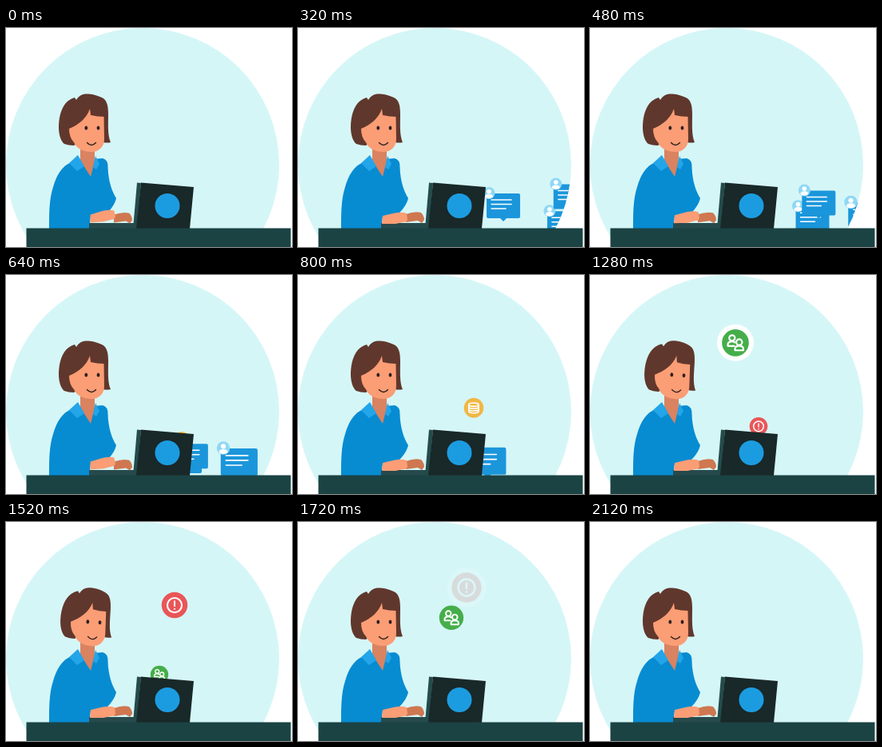
An HTML page for the animation above (2200 ms loop, 358 by 274 pixels).

```html
<!DOCTYPE html>
<html lang="en">
<head>
<meta charset="utf-8">
<title>Messages at a laptop</title>
<style>
  html, body { margin: 0; width: 100%; height: 100%; overflow: hidden; background: #fff; }
  svg { display: block; width: 358px; height: 274px; }
  .line { fill: none; stroke: #fff; stroke-width: 2.2; stroke-linecap: round; stroke-linejoin: round; }
  .thin { stroke-width: 1.5; }
</style>
</head>
<body>
<svg viewBox="0 0 358 274">
  <defs>
    <clipPath id="room"><circle cx="171" cy="171" r="171"/></clipPath>

    <g id="bubble">
      <path fill="#1b96db" d="M2 0H40Q42 0 42 2V29Q42 31 40 31H25L21 35L17 31H2Q0 31 0 29V2Q0 0 2 0Z"/>
      <path class="line thin" d="M6 8H31M6 13.500H31M6 19H24"/>
      <circle cx="3" cy="-.5" r="7.500" fill="#8fd8f5"/>
      <circle cx="3" cy="-2.500" r="2.800" fill="#fff"/>
      <path fill="#fff" d="M-2 4.500Q-2 .8 3 .8Q8 .8 8 4.500Q3 8 -2 4.500Z"/>
    </g>

    <g id="stack" class="line">
      <ellipse cy="-5.500" rx="8.500" ry="3"/>
      <path d="M-8.500 -5.500V6C-8.500 10 8.500 10 8.500 6V-5.500M-8.500 -1.500C-8.500 2.400 8.500 2.400 8.500 -1.500M-8.500 2.300C-8.500 6.200 8.500 6.200 8.500 2.300"/>
    </g>
    <g id="people" class="line">
      <circle cx="-4.200" cy="-6" r="3.600"/>
      <path d="M-1.500 4H-9.500V2C-9.500 -2 -3 -2.500 -.8 -.5"/>
      <circle cx="4.800" cy="-.8" r="3.700"/>
      <path d="M-.5 9.500V7.500C-.5 2.600 10 2.600 10 7.500V9.500Z"/>
    </g>
    <g id="alert" class="line">
      <circle r="9.500"/>
      <path d="M0 -5V1M0 4.900V5"/>
    </g>
  </defs>

  <circle cx="171" cy="171" r="171" fill="#d5f6f7"/>
  <g id="mail" clip-path="url(#room)"></g>
  <g id="coins"></g>

  <path fill="#078cd2" d="M54 251C54 232 54 214 59 199C63 185 70 172 82 168L110 164L121 163Q128 165 127.500 174C128 192 133 205 138 213C136 221 131 227 127 231L106 236L104 251Z"/>
  <path fill="#d98361" d="M93 148H111V166L106 186L93 166Z"/>
  <path fill="#23a5ea" d="M79 169L90 159L98 173L89 179ZM112 160L117 170L113 177L109 174Z"/>

  <g id="head">
    <path fill="#60372c" d="M88 90L86 87Q82 88 78 91C70 97 66 110 66 124C66 134 69 142 73 145Q78 147 85 147L95 140L120 112L121 143Q127 144 131 143C127 134 128 121 128 108C128 96 126 90 120 87C112 83 104 82 99 82.500Q92 83 88 90Z"/>
    <path fill="#fb9d75" d="M105 101L106 109Q114 111 122.500 111L123 139C123 149 116 155 107 155C97 155 88 151 85 143Q79 137 79 126C91 121 101 113 105 101Z"/>
    <ellipse class="eye" cx="100.300" cy="125" fill="#2c2020"/>
    <ellipse class="eye" cx="115.500" cy="125" fill="#2c2020"/>
    <path d="M101.500 143.500Q107 149.500 112.500 143.500" fill="none" stroke="#2c2020" stroke-width="1.400" stroke-linecap="round"/>
  </g>

  <path fill="#274a4c" d="M104 244H162V251H104Z"/>
  <path id="farHand" fill="#cf7750" d="M135 233Q146 229 154 231Q158 235 158 240L155 244L150 241L135 243Z"/>
  <path id="nearHand" fill="#fb9d75" d="M106 235L121 231.500Q131 230 136 232L137 239Q137 243 132 243L122 245H105Z"/>

  <path fill="#234c4b" d="M164 193.500L169 194L164 251H159Z"/>
  <path fill="#192829" d="M169 193.500L235 199L230 251H163Z"/>
  <circle cx="202" cy="222.500" r="15.500" fill="#1c9ce0"/>
  <rect x="25.500" y="250.500" width="331" height="24" fill="#1b4344"/>
</svg>

<script>
const LOOP = 2200, STEP = 40;
const $ = id => document.getElementById(id);

function set(el, attrs) {
  for (const key in attrs) el.setAttribute(key, attrs[key]);
}

function add(parent, tag, attrs = {}) {
  const el = document.createElementNS('http://www.w3.org/2000/svg', tag);
  set(el, attrs);
  return parent.appendChild(el);
}

const mix = (a, b, k) => a + (b - a) * k;
const progress = (t, start, span) => Math.min(1, Math.max(0, (t - start) / span));
const smooth = k => k * k * (3 - 2 * k);

// Bubbles slide at one speed from the right edge into the laptop.
const SLIDE = 470;
const bubbles = [
  { start: 416, y: 219, size: 1.1 },
  { start: 223, y: 233, size: 1 },
  { start: 246, y: 192, size: 1 },
  { start: 0, y: 190, size: 1 }
].map(b => ({ ...b, el: add($('mail'), 'use', { href: '#bubble' }) }));

function drawBubbles(t) {
  for (const { start, y, size, el } of bubbles) {
    const k = progress(t, start, SLIDE);
    el.style.display = k > 0 && k < 1 ? '' : 'none';
    set(el, { transform: `translate(${mix(345, 185, k)} ${mix(y, 215, k)}) scale(${size})` });
  }
}

// Coins rise from behind the laptop, gain a white ring, then swell and fade.
const FADE = 80;
const coins = [
  { x: 220, top: 66, start: 565, rise: 630, color: '#f0b846', icon: 'stack' },
  { x: 182, top: 73, start: 841, rise: 535, color: '#45ae4a', icon: 'people' },
  { x: 211, top: 82, start: 1145, rise: 508, color: '#e95658', icon: 'alert' },
  { x: 192, top: 78, start: 1387, rise: 530, color: '#45ae4a', icon: 'people' }
].map(coin => {
  const el = add($('coins'), 'g');
  return {
    ...coin, el,
    ring: add(el, 'circle', { fill: '#fff' }),
    disc: add(el, 'circle', { fill: coin.color }),
    mark: add(el, 'use', { href: '#' + coin.icon })
  };
});

function drawCoins(t) {
  for (const { x, top, start, rise, el, ring, disc, mark } of coins) {
    const k = progress(t, start, rise);
    const fade = progress(t, start + rise, FADE);
    const height = smooth(k), r = 10 + 7.5 * height;
    el.style.display = k > 0 && fade < 1 ? '' : 'none';
    set(el, {
      transform: `translate(${x} ${mix(212, top, height)}) scale(${1 + .08 * fade})`,
      opacity: 1 - fade
    });
    set(ring, { r: mix(10, 23, smooth(progress(k, .68, .14))) });
    set(disc, { r });
    set(mark, { transform: `scale(${r / 17})` });
  }
}

function drawWoman(t) {
  const turn = smooth(progress(t, 1140, 140)) - smooth(progress(t, 1520, 160));
  set($('head'), { transform: `translate(${turn} 0) rotate(${turn * 3} 104 145)` });

  const closed = t >= 960 && t <= 1040;
  for (const eye of document.querySelectorAll('.eye')) {
    set(eye, closed ? { rx: 2.8, ry: .7 } : { rx: 1.9, ry: 2.5 });
  }

  // Two bursts of typing, with the hands at rest in between.
  let lift = 0;
  if (t < 746) lift = Math.cos(Math.PI * t * 3 / 640) ** 2;
  else if (t > 1720) lift = Math.sin(Math.PI * (t - 1720) / 200) ** 2;
  set($('nearHand'), { transform: `translate(0 ${-lift * 1.5}) rotate(${-lift * 4} 106 240)` });
  set($('farHand'), { transform: `translate(0 ${lift * .6})` });
}

const origin = performance.now();
function tick() {
  const clock = (performance.now() - origin) % LOOP;
  const t = Math.min(LOOP - 2 * STEP, Math.floor(clock / STEP) * STEP);
  drawBubbles(t);
  drawCoins(t);
  drawWoman(t);
  requestAnimationFrame(tick);
}
tick();
</script>
</body>
</html>
```
